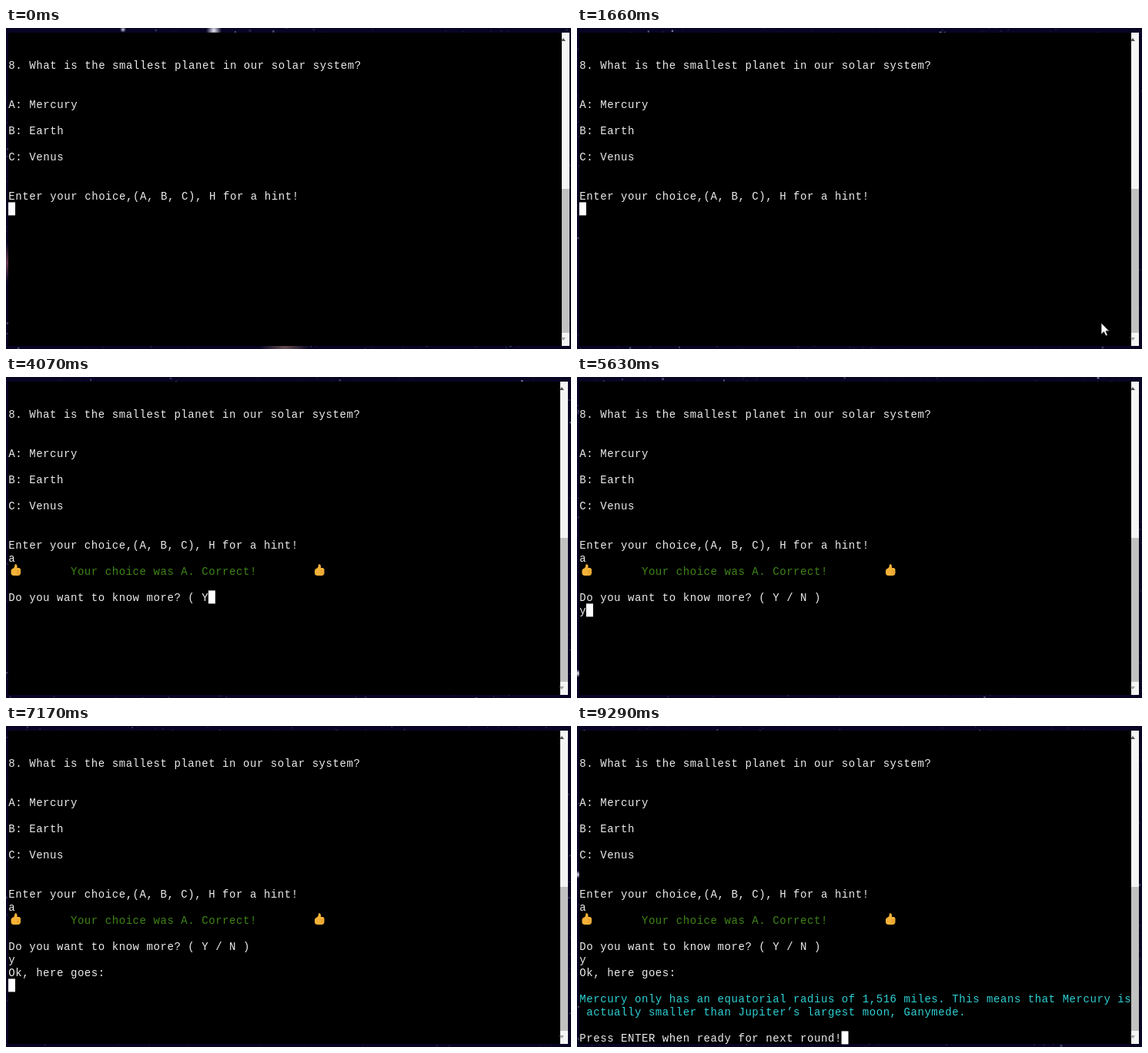
Animation, 734 px wide and 417 px high, one loop 9.44 s. Source, as an HTML page with a canvas:

```html
<!DOCTYPE html>
<html lang="en">
<head>
<meta charset="utf-8">
<title>Planet quiz terminal</title>
<style>
html, body { margin: 0; width: 100%; height: 100%; overflow: hidden; background: #080524; }
canvas { display: block; }
</style>
</head>
<body>
<canvas id="stage" width="734" height="417"></canvas>
<script>
const ctx = document.getElementById('stage').getContext('2d');
const W = 734, H = 417, LOOP = 9440;
const LEFT = 3, TOP = 5.4, ROW = 17, COLS = 80;
const WHITE = '#ececec', GREEN = '#3f8517', CYAN = '#2ecfd3';
const KEY = 44.3; // ms per typed character

// row, column, text, start time, ms per character, colour
const lines = [
  [2, 0, '8. What is the smallest planet in our solar system?'],
  [5, 0, 'A: Mercury'],
  [7, 0, 'B: Earth'],
  [9, 0, 'C: Venus'],
  [12, 0, 'Enter your choice,(A, B, C), H for a hint!'],
  [13, 0, 'a', 1950],
  [14, 9, 'Your choice was A. Correct!', 2400, 0, GREEN],
  [16, 0, 'Do you want to know more? ( Y / N )', 2800, KEY],
  [17, 0, 'y', 5300],
  [18, 0, 'Ok, here goes:', 5780, KEY],
  [20, 0, 'Mercury only has an equatorial radius of 1,516 miles. This means that Mercury is', 7560, 0, CYAN],
  [21, 0, ' actually smaller than Jupiter’s largest moon, Ganymede.', 7560, 0, CYAN],
  [23, 0, 'Press ENTER when ready for next round!', 7580, KEY]
];

// time from which the block cursor waits at the start of a row
const waits = [[0, 13], [2400, 16], [4380, 17], [5780, 18], [6430, 19], [7560, 23]];

let seed = 8;
const random = () => (seed = seed * 16807 % 2147483647) / 2147483647;
const stars = Array.from({ length: 5000 }, () => ({
  angle: random() * Math.PI * 2,
  dist: Math.sqrt(random()),
  size: 0.8 + random() ** 5 * 2.4,
  light: 0.1 + random() ** 3 * 0.6
}));

// x, y, peak time, radius, rgb
const glows = [
  [270, 3, 0, 10, '235,235,250'], [152, 2, 0, 4, '200,205,230'],
  [1, 305, 0, 26, '105,60,85'], [362, 416, 0, 32, '100,75,80'],
  [570, 415, 2830, 11, '240,235,230'], [1, 340, 2830, 5, '240,240,250'],
  [1, 385, 5630, 5, '240,240,250'], [1, 193, 9290, 5, '220,220,240']
];

function drawSpace(t) {
  ctx.fillStyle = '#080524';
  ctx.fillRect(0, 0, W, H);
  for (const s of stars) {
    const d = (s.dist + t * 0.000012) % 1 * 430;
    const x = W / 2 + Math.cos(s.angle) * d, y = H / 2 + Math.sin(s.angle) * d;
    ctx.fillStyle = `rgba(165,165,205,${s.light})`;
    ctx.fillRect(x, y, s.size, s.size);
  }
  for (const [x, y, peak, r, rgb] of glows) {
    const alpha = 1 - Math.abs(t - peak) / 400;
    if (alpha <= 0) continue;
    const g = ctx.createRadialGradient(x, y, 0, x, y, r);
    g.addColorStop(0, `rgba(${rgb},${alpha})`);
    g.addColorStop(1, `rgba(${rgb},0)`);
    ctx.fillStyle = g;
    ctx.fillRect(x - r, y - r, 2 * r, 2 * r);
  }
}

function shape(x, y, path, fill, stroke) {
  ctx.save();
  ctx.translate(x, y);
  const p = new Path2D(path);
  ctx.fillStyle = fill;
  ctx.fill(p);
  if (stroke) {
    ctx.strokeStyle = stroke;
    ctx.lineWidth = 0.9;
    ctx.stroke(p);
  }
  ctx.restore();
}

function drawThumb(x, y) {
  shape(x, y, 'M5 0.5Q8.5 -0.5 8 5H10.5Q13 6 12.5 8.5V12Q12 15 9 15H3Q0 14.5 0 11.5V9Q0 6.5 3 5.5Q5 4 5 0.5Z', '#f5b238');
  ctx.fillStyle = '#d08e28';
  for (const dy of [8, 10.2, 12.4]) ctx.fillRect(x + 7.5, y + dy, 4, 0.6);
}

function drawScrollbar(x) {
  ctx.fillStyle = '#f4f4f4';
  ctx.fillRect(x, 6, 10, 407);
  ctx.fillStyle = '#c1c1c1';
  ctx.fillRect(x, 209, 10, 187);
  shape(x - 1, 12, 'M0 5L3 1L6 5Z', '#505050');
  shape(x - 1, 401, 'M0 1L3 5L6 1Z', '#a3a3a3');
}

function drawTerminal(t) {
  const right = t < 90 ? 722 : 720;
  const cell = (right - LEFT) / COLS;
  ctx.fillStyle = '#000';
  ctx.fillRect(LEFT, 6, right - LEFT, 407);
  drawScrollbar(right);

  ctx.font = '14px "Liberation Mono", "Courier New", monospace';
  ctx.textAlign = 'center';
  const [, cursorRow] = waits.filter(([at]) => t >= at).pop();
  let cursorCol = 0;
  for (const [row, col, text, start = 0, speed = 0, color = WHITE] of lines) {
    if (t < start) continue;
    const shown = speed ? Math.min(text.length, Math.floor((t - start) / speed) + 1) : text.length;
    ctx.fillStyle = color;
    for (let i = 0; i < shown; i++) {
      ctx.fillText(text[i], LEFT + (col + i + 0.5) * cell, TOP + row * ROW + 13.6);
    }
    if (row === cursorRow) cursorCol = col + shown;
  }
  if (t >= 2400) {
    drawThumb(6.5, 243);
    drawThumb(401, 243);
  }
  ctx.fillStyle = '#fff';
  ctx.fillRect(LEFT + cursorCol * cell, TOP + cursorRow * ROW, cell, ROW);
}

function draw(now) {
  const t = now % LOOP;
  drawSpace(t);
  drawTerminal(t);
  if (t >= 1200 && t < 1950) {
    shape(681, 383, 'M0 0V15L3.5 11.8L6 17L8.3 16L6 10.8H10.5Z', '#fff', '#222');
  }
  requestAnimationFrame(draw);
}
requestAnimationFrame(draw);
</script>
</body>
</html>
```
